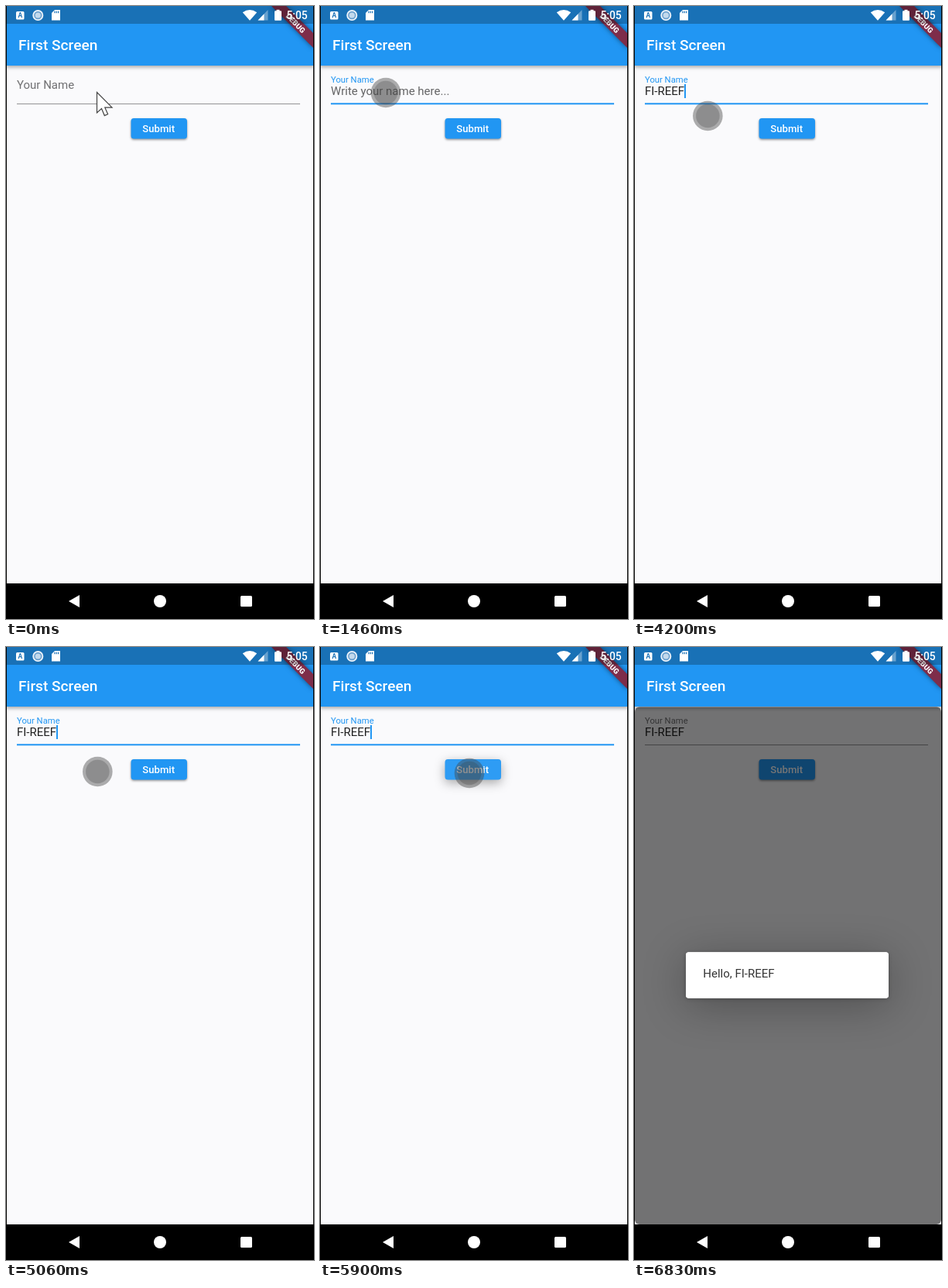
Recreate the animation shown at these times as an HTML page with a canvas. Size 398x792 px, loop 7.33 s.

```html
<!DOCTYPE html>
<html lang="en">
<head>
<meta charset="utf-8">
<title>First Screen</title>
<style>
  html, body { margin: 0; width: 100%; height: 100%; overflow: hidden; background: #000; }
  canvas { display: block; width: 398px; height: 792px; }
</style>
</head>
<body>
<canvas id="stage"></canvas>
<script>
const W = 398, H = 792, LOOP = 7330;
const BLUE = '#2196f3', PAPER = '#fafafc', NAME = 'FI-REEF';
const KEYS = [2100, 2230, 2830, 3030, 3160, 3500, 3730];
const FOCUS = 1030, PRESS = 5700, OPEN = 5960;

// Pointer path: time, x, y
const PATH = [
  [30, 115, 112], [600, 85, 112], [4170, 85, 112], [4230, 105, 170], [4960, 105, 170],
  [5060, 118, 161], [5530, 193, 163], [6670, 193, 163], [6800, 310, 114], [6830, 310, 114]
];

const canvas = document.getElementById('stage');
const ctx = canvas.getContext('2d');
const dpr = window.devicePixelRatio || 1;
canvas.width = W * dpr;
canvas.height = H * dpr;

const clamp = v => Math.min(1, Math.max(0, v));
const ramp = (t, from, to) => clamp((t - from) / (to - from));
const mix = (a, b, k) => a + (b - a) * k;
const easeOut = k => 1 - (1 - k) * (1 - k);
const smooth = k => k * k * (3 - 2 * k);
const blend = (a, b, k) =>
  `rgb(${a.map((v, i) => Math.round(mix(v, b[i], k))).join(',')})`;

function rect(x, y, w, h, color) {
  ctx.fillStyle = color;
  ctx.fillRect(x, y, w, h);
}

function round(x, y, w, h, r, color) {
  ctx.beginPath();
  ctx.roundRect(x, y, w, h, r);
  ctx.fillStyle = color;
  ctx.fill();
}

function disc(x, y, r, color) {
  ctx.beginPath();
  ctx.arc(x, y, r, 0, Math.PI * 2);
  ctx.fillStyle = color;
  ctx.fill();
}

function poly(points, color) {
  ctx.beginPath();
  points.forEach(([x, y]) => ctx.lineTo(x, y));
  ctx.closePath();
  ctx.fillStyle = color;
  ctx.fill();
}

function setFont(size, weight = 400) {
  ctx.font = `${weight} ${size}px Roboto, sans-serif`;
}

function text(str, x, y, size, color, weight, align = 'left') {
  setFont(size, weight);
  ctx.textAlign = align;
  ctx.fillStyle = color;
  ctx.fillText(str, x, y);
}

function shadowed(blur, dy, color, draw) {
  ctx.save();
  ctx.shadowBlur = blur * dpr;
  ctx.shadowOffsetY = dy * dpr;
  ctx.shadowColor = color;
  draw();
  ctx.restore();
}

function drawStatusIcons() {
  const bar = '#1970b6', soft = 'rgba(255,255,255,.35)';
  round(13, 7, 10.5, 10.5, 1.5, '#fff');
  text('A', 18.3, 15.4, 8.5, bar, 700, 'center');

  disc(41.3, 12, 7, '#eef4fa');
  disc(41.3, 12, 5.2, '#6a9fcd');
  disc(41.3, 12, 3.6, '#c3d9ec');

  poly([[63, 5], [70, 5], [70, 18.5], [59, 18.5], [59, 9]], '#fff');
  [62.4, 64.7, 67].forEach(x => rect(x, 6.6, 1.2, 2.6, bar));

  ctx.beginPath();
  ctx.moveTo(315, 18.8);
  ctx.lineTo(305.8, 8.2);
  ctx.quadraticCurveTo(315, 1.8, 324.2, 8.2);
  ctx.closePath();
  ctx.fillStyle = '#fff';
  ctx.fill();

  poly([[338.5, 5], [338.5, 18.5], [325.5, 18.5]], soft);
  poly([[333.5, 10.2], [333.5, 18.5], [325.5, 18.5]], '#fff');

  round(347, 6.2, 9, 12.6, 1, '#fff');
  rect(349.5, 4.8, 4, 2, '#fff');
  text('5:05', 362.5, 17, 13.8, '#fff', 500);
}

function drawBars() {
  shadowed(5, 2, 'rgba(0,0,0,.35)', () => rect(0, 0, W, 77, BLUE));
  text('First Screen', 16, 57, 19.1, '#fff', 500);

  ctx.save();
  ctx.beginPath();
  ctx.rect(0, 0, 397, 77);
  ctx.clip();
  shadowed(6, 0, 'rgba(0,0,0,.5)', () =>
    poly([[343, 0], [362, 0], [398, 36], [398, 55]], '#7e2d4a'));
  ctx.translate(374.3, 22.3);
  ctx.rotate(Math.PI / 4);
  text('DEBUG', 0, 3.4, 9.6, '#fff', 900, 'center');
  ctx.restore();

  rect(0, 0, W, 23, 'rgba(0,0,0,.25)');
  drawStatusIcons();
}

function drawNav() {
  rect(0, 746, W, 46, '#000');
  poly([[81, 769], [95, 761], [95, 777]], '#fff');
  disc(199, 769, 8, '#fff');
  round(303, 762, 15, 14, 1.5, '#fff');
  rect(0, 0, 1, H, '#000');
  rect(397, 0, 1, H, '#000');
}

function caretOn(t) {
  if (t < FOCUS || t >= OPEN) return false;
  let since = 960;
  KEYS.forEach(k => { if (t >= k) since = k; });
  return Math.floor((t - since) / 500) % 2 === 0;
}

function drawField(t) {
  const lift = t < FOCUS ? 0 : t < FOCUS + 30 ? 0.5 : 1;
  const lit = lift * (1 - ramp(t, OPEN, OPEN + 200));
  const typed = NAME.slice(0, KEYS.filter(k => t >= k).length);

  const label = blend([112, 112, 114], [33, 150, 243], lit);
  text('Your Name', 14, mix(107, 99, lift), mix(15, 11.25, lift), label);

  const hint = lift * (1 - ramp(t, KEYS[0], KEYS[0] + 200));
  if (hint > 0) {
    text('Write your name here...', 14, 115, 15, `rgba(0,0,0,${0.6 * hint})`);
  }
  text(typed, 14, 115, 15, 'rgba(0,0,0,.87)');

  rect(14, 126, 366, 1, '#929294');
  if (lit > 0) {
    ctx.globalAlpha = lit;
    rect(14, 125.3, 366, 2, BLUE);
    ctx.globalAlpha = 1;
  }
  if (caretOn(t)) {
    setFont(15);
    rect(14 + Math.round(ctx.measureText(typed).width), 101, 2, 18, BLUE);
  }
}

function drawButton(t) {
  const up = ramp(t, PRESS, PRESS + 200) * (1 - ramp(t, OPEN, OPEN + 200));
  shadowed(mix(3, 14, up), mix(1.5, 4, up), `rgba(0,0,0,${mix(0.4, 0.34, up)})`, () =>
    round(161.5, 145, 72.5, 26.5, 3.8, BLUE));
  if (up > 0) round(161.5, 145, 72.5, 26.5, 3.8, `rgba(255,255,255,${0.06 * up})`);
  text('Submit', 197.2, 163.3, 13.1, '#fff', 500, 'center');
}

function drawDialog(t) {
  if (t < OPEN) return;
  const k = easeOut(ramp(t, OPEN, OPEN + 200));
  const veil = mix(0.5, 0.54, k);
  round(1, 77.5, 396, 668.5, 6, `rgba(0,0,0,${veil})`);

  // The margin darkens ahead of the page body.
  ctx.beginPath();
  ctx.roundRect(1, 77.5, 396, 668.5, 6);
  ctx.rect(14, 89, 366, 631);
  ctx.fillStyle = `rgba(0,0,0,${0.09 * (1 - k)})`;
  ctx.fill('evenodd');

  ctx.globalAlpha = mix(0.86, 1, k);
  shadowed(55, 9, 'rgba(0,0,0,.3)', () => round(67, 394.3, 262, 59.4, 3.8, '#fff'));
  shadowed(5, 1, 'rgba(0,0,0,.25)', () => round(67, 394.3, 262, 59.4, 3.8, '#fff'));
  text('Hello, ' + NAME, 89.3, 427, 15, 'rgba(0,0,0,.8)');
  ctx.globalAlpha = 1;
}

function drawPointer(t) {
  if (t < 30) {
    poly([[117.5, 111.5], [117.5, 138], [123.5, 132.6], [127.3, 141.6],
      [131.6, 139.8], [127.8, 131.2], [137, 131.2]], '#fff');
    ctx.strokeStyle = '#444';
    ctx.lineWidth = 1.2;
    ctx.stroke();
    return;
  }
  if (t >= 6830) return;
  const i = PATH.findIndex(p => t < p[0]);
  const [t0, x0, y0] = PATH[i - 1], [t1, x1, y1] = PATH[i];
  let k = ramp(t, t0, t1);
  if (t1 === 600) k = smooth(k);
  if (t1 === 5530) k = easeOut(k);
  const x = mix(x0, x1, k), y = mix(y0, y1, k);
  disc(x, y, 19.3, 'rgba(70,70,70,.44)');
  disc(x, y, 15.3, 'rgba(62,62,62,.27)');
}

function draw(t) {
  ctx.setTransform(dpr, 0, 0, dpr, 0, 0);
  rect(0, 0, W, H, PAPER);
  drawBars();
  drawField(t);
  drawButton(t);
  drawDialog(t);
  drawNav();
  drawPointer(t);
}

const start = performance.now();
function tick() {
  draw((performance.now() - start) % LOOP);
  requestAnimationFrame(tick);
}
draw(0);
requestAnimationFrame(tick);
</script>
</body>
</html>
```
